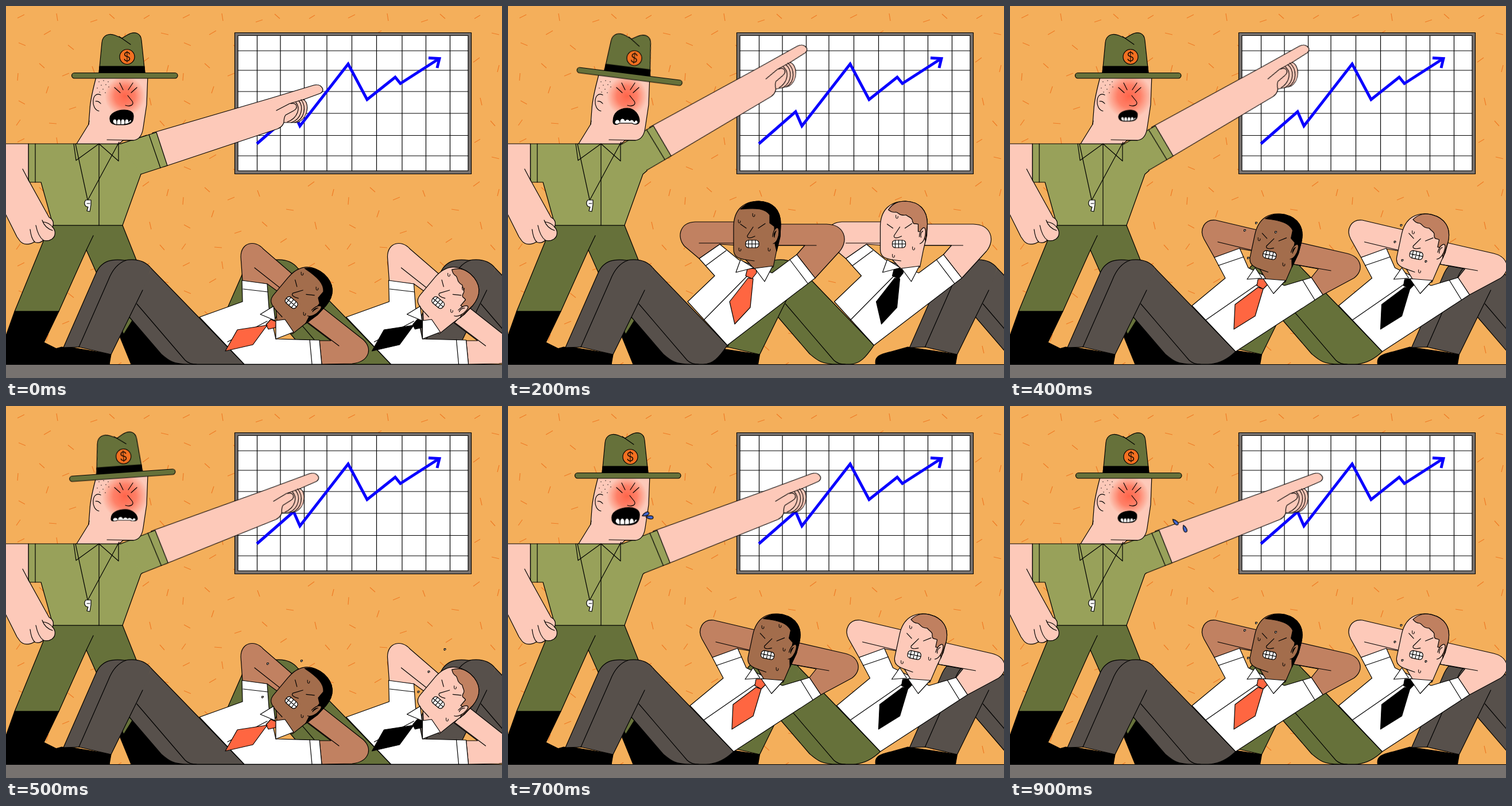
Recreate the animation shown at these times as an HTML page without scripts. Size 864 px wide and 648 px high, loop 1000 ms.

```html
<!DOCTYPE html>
<html lang="en">
<head>
<meta charset="utf-8">
<title>Sales drill</title>
<style>
html, body { margin: 0; width: 100%; height: 100%; overflow: hidden; background: #f4af5b; }
svg { display: block; width: 100vw; height: 100vh; }
.ink, .ink path, .ink circle, .ink rect { stroke: #000; stroke-width: 1.2; stroke-linejoin: round; stroke-linecap: round; }
.line { fill: none; }
.white { fill: #fff; }
.skin { fill: #fdc9b9; }
.shirt { fill: #98a15a; }
.olive { fill: #66713a; }
.grey { fill: #77726f; }
.arm { fill: var(--skin); }
.face { fill: var(--face); }
.pants { fill: var(--pants); }
.tie { fill: var(--tie); }
.hair-a { display: var(--a, none); }
.hair-b { display: var(--b, none); fill: #c08060; }
.man-a { --skin: #c18161; --face: #a36d4c; --pants: #57504b; --tie: #ff6641; --a: inline; }
.man-b { --skin: #fdc9b9; --face: #fdc9b9; --pants: #66713a; --tie: #000; --b: inline; }
.man-c { --pants: #57504b; }
.ink .drops, .ink .beads, .ink .stubble { fill: none; stroke: none; }
.drops { marker: url(#drop); }
.beads { marker: url(#bead); }
.stubble { marker: url(#dot); }

.low, .mid, .up, .low1, .low2, .mid1, .mid2, .up1, .up2, .reach, .hat, .open, .frown, .blush, .spit1, .spit2 { animation: 1s step-end infinite; }
.low { animation-name: low; }
.mid { animation-name: mid; }
.up { animation-name: up; }
.low1 { animation-name: low1; }
.low2 { animation-name: low2; }
.mid1 { animation-name: mid1; }
.mid2 { animation-name: mid2; }
.up1 { animation-name: up1; }
.up2 { animation-name: up2; }
.reach { animation-name: reach; transform-origin: 205px 255px; }
.hat { animation-name: hat; transform-origin: 206.5px 121px; }
.open { animation-name: open; }
.frown { animation-name: frown; }
.blush { animation-name: blush; transform-origin: 207px 157px; }
.spit1 { animation-name: spit1; }
.spit2 { animation-name: spit2; }

@keyframes low { 0%, 50% { visibility: visible } 10%, 70% { visibility: hidden } }
@keyframes mid { 0%, 20%, 50%, 80% { visibility: hidden } 10%, 40%, 70%, 90% { visibility: visible } }
@keyframes up { 0%, 40%, 90% { visibility: hidden } 20%, 80% { visibility: visible } }
@keyframes low1 { 0%, 60% { visibility: visible } 10%, 70% { visibility: hidden } }
@keyframes low2 { 0%, 60% { visibility: hidden } 50% { visibility: visible } }
@keyframes mid1 { 0%, 20%, 80% { visibility: hidden } 10%, 70% { visibility: visible } }
@keyframes mid2 { 0%, 50% { visibility: hidden } 40%, 90% { visibility: visible } }
@keyframes up1 { 0%, 30%, 90% { visibility: hidden } 20%, 80% { visibility: visible } }
@keyframes up2 { 0%, 40% { visibility: hidden } 30% { visibility: visible } }
@keyframes reach {
  0%, 60% { transform: none }
  10%, 50%, 70%, 90% { transform: rotate(-3.5deg) }
  20%, 80% { transform: rotate(-12.3deg) }
}
@keyframes hat {
  0%, 10%, 90% { transform: none }
  20% { transform: translate(5px, 1.5px) rotate(7.2deg) }
  30% { transform: translate(2px, 1px) rotate(3deg) }
  40% { transform: translate(-1px, 0) }
  50% { transform: translate(-4px, -.5px) rotate(-4deg) }
  60% { transform: translate(-1px, 0) rotate(-1.5deg) }
  70% { transform: translate(2px, 0) }
  80% { transform: translate(1px, 0) }
}
@keyframes open {
  0% { transform: translate(202px, 194px) }
  10% { transform: translate(205px, 192px) scale(1.14) }
  20%, 30%, 50%, 80% { transform: scale(0) }
  40% { transform: translate(206px, 191px) scale(.8, .75) }
  60% { transform: translate(204px, 192px) scale(1.05, .95) }
  70% { transform: translate(205.5px, 192px) scale(1.17) }
  90% { transform: translate(205px, 193px) scale(.8, .78) }
}
@keyframes frown {
  0%, 40%, 60%, 90% { transform: scale(0) }
  20%, 80% { transform: translate(206px, 193px) }
  30% { transform: translate(206px, 192px) scale(.9, .85) }
  50% { transform: translate(206px, 191px) scale(1, .72) }
}
@keyframes blush { 0%, 60% { transform: none } 30% { transform: scale(1.14) } }
@keyframes spit1 {
  0% { transform: scale(0) }
  70% { transform: translate(241px, 188px) rotate(-25deg) }
  80% { transform: translate(268px, 186px) rotate(10deg) }
  90% { transform: translate(289px, 203px) rotate(45deg) }
}
@keyframes spit2 {
  0% { transform: scale(0) }
  70% { transform: translate(248px, 194px) rotate(5deg) }
  80% { transform: translate(280px, 198px) rotate(35deg) }
  90% { transform: translate(305px, 215px) rotate(68deg) }
}
</style>
</head>
<body>
<svg viewBox="0 0 864 648">
<defs>
  <pattern id="flecks" width="288" height="216" patternUnits="userSpaceOnUse">
    <path fill="none" stroke="#ee7a24" stroke-width="1.2" d="M20 21l12-6M88 13l2 13M147 28l12-4M180 14l9 8M240 22l10-6M22 64l12 5M66 50l12-7M108 68l10 8M270 47l13 3M205 60l3-12M20 130l1-13M58 100l9 8M98 122l12-5M150 105l4 11M238 98l11-8M280 115l3-12M22 165l11 6M70 152l4-12M110 180l12-4M158 160l9 8M200 138l13 2M250 160l3 13M18 208l7-10M75 204l13 1M190 196l11-7M268 200l8 9"/>
  </pattern>
  <radialGradient id="rage">
    <stop offset="0" stop-color="#ff5a3e" stop-opacity=".9"/><stop offset=".5" stop-color="#ff6145" stop-opacity=".7"/><stop offset="1" stop-color="#ff6a4a" stop-opacity="0"/>
  </radialGradient>
  <marker id="drop" markerUnits="userSpaceOnUse" markerWidth="10" markerHeight="10" viewBox="-5 -5 10 10"><path fill="none" stroke="#000" d="M-1.8-3V1a1.8 2 0 0 0 3.6 0v-2"/></marker>
  <marker id="bead" markerUnits="userSpaceOnUse" markerWidth="10" markerHeight="10" viewBox="-5 -5 10 10"><path fill="#a39a94" stroke="#000" d="M-1.5-1.5h3v2l-1 1h-2z"/></marker>
  <marker id="dot" markerUnits="userSpaceOnUse" markerWidth="4" markerHeight="4" viewBox="-2 -2 4 4"><circle r=".7"/></marker>

  <g id="shin">
    <path d="M41 624C38 607 55 606 72 601L97 594 183 607 180 624Z"/>
    <path class="pants" d="M238 495L183 607 127 594 100 595 157 465C168 440 190 441 207 443 225 440 242 443 253 457"/>
    <path class="line" d="M127 594L178 478C186 457 197 447 209 443"/>
  </g>
  <path id="crease" class="line" d="M228 519L312 617Q319 624 332 624"/>

  <g id="head">
    <path class="face" d="M-41-15C-41-45-24-60 3-60 27-59 41-45 41-20L40 0 34 25 28 55-5 58-20 42C-34 40-41 36-41 24Z"/>
    <path class="hair-a" d="M-29-46C-20-56-10-60 3-60 27-59 41-45 41-20L40 2 34 27 31 14 30-16 22-22 22-36C14-47 0-49-29-46Z"/>
    <path class="hair-b" d="M-27-45C-18-58-8-60 3-60 27-59 41-45 41-20L38 10 33-7H25V-20C20-22 17-18 15-25 15-32 8-32 4-36-8-34-8-40-14-41-20-40-23-42-27-45Z"/>
    <path class="face" d="M27 2C28-13 38-20 38-7 38 3 34 12 28 14M33-8Q28-4 30 3"/>
    <path class="line" d="M-29-20L-19-13M14-21L2-13M-7-15L-17 0C-18 6-10 4-4 1M-20 42L-5 44"/>
    <rect class="white" x="-20" y="8" width="23" height="13" rx="5"/>
    <path class="line" d="M-15 8v13M-9 8v13M-3 8v13M-20 14.5H3"/>
  </g>

  <g id="low">
    <path class="pants" d="M253 457L415 624H318C290 624 283 617 270 606L215 542"/>
    <use href="#crease"/>
    <path class="arm" d="M412 479L409 437C409 411 434 407 448 423L500 468 480 502 455 484Z"/>
    <path class="line" d="M433 456L476 490"/>
    <path class="arm" d="M525 552L551 525 622 581C640 597 632 620 603 623L550 624 546 583H566Z"/>
    <path class="line" d="M527 552L580 592"/>
    <path class="white" d="M411 478L455 484 458 525 470 580 546 582 550 624H415L337 542 412 515Z"/>
    <path class="line" d="M413 493L456 498M529 581L533 624M386 585L455 549"/>
    <path class="tie" d="M382 601L403 564 455 556 430 590ZM453 555L461 546 471 550 470 560 457 563Z"/>
    <use href="#head" transform="translate(513 511) rotate(40)"/>
    <path class="white" d="M443 537L466 523 469 548ZM470 548V580L501 568 486 546Z"/>
  </g>
  <g id="mid">
    <path class="pants" d="M253 457L393 602C375 619 360 624 345 624H318C290 624 283 617 270 606L215 542"/>
    <use href="#crease"/>
    <path class="arm" d="M430 390L358 373C339 371 329 389 338 406L356 438 401 423 424 427Z"/>
    <path class="line" d="M362 411L424 426"/>
    <path class="arm" d="M500 411L587 431C612 437 618 460 599 474L545 503 525 473 537 458 494 450Z"/>
    <path class="line" d="M495 450L559 461"/>
    <path class="white" d="M356 438L400 422 415 456 478 487 525 473 545 503 393 602 317 522 375 474Z"/>
    <path class="line" d="M363 452L407 437M510 478L531 512M432 484L341 547"/>
    <path class="tie" d="M432 490L441 493 427 540 390 563 392 520ZM432 476L446 475 449 485 441 493 430 487Z"/>
    <use href="#head" transform="translate(463.5 421.5) rotate(12)"/>
    <path class="white" d="M413 476L427 456 439 474ZM441 475L459 501 480 478Z"/>
  </g>
  <g id="up">
    <path class="pants" d="M253 457L382 591C368 612 357 624 340 624H318C290 624 283 617 270 606L215 542"/>
    <use href="#crease"/>
    <path class="arm" d="M398 376H326C300 377 293 401 307 418L333 440 369 415 400 417Z"/>
    <path class="line" d="M333 413H400"/>
    <path class="arm" d="M470 380H555C586 381 594 407 578 427L535 474 503 433 517 417H468Z"/>
    <path class="line" d="M470 417H537"/>
    <path class="white" d="M333 440L369 415 402 442 460 465 503 433 535 474 382 591 313 515 360 470Z"/>
    <path class="line" d="M345 452L380 426M491 442L522 483M416 471L341 547"/>
    <path class="tie" d="M418 474L427 475 422 525 395 554 386 515ZM417 458L432 457 433 465 425 475 414 470Z"/>
    <use href="#head" transform="translate(434 400)"/>
    <path class="white" d="M397 464L405 442 428 456ZM430 457L447 480 461 453Z"/>
  </g>
  <path id="drip" d="M-8 0C-3-3.5 5-4 5 0S-3 3.5-8 0Z"/>
</defs>

<rect width="864" height="648" fill="#f4af5b"/>
<rect width="864" height="648" fill="url(#flecks)"/>

<g class="ink">
  <rect class="grey" x="398.5" y="46.5" width="412" height="246"/>
  <rect class="white" x="404" y="51.5" width="401" height="235.5"/>
  <path class="line" d="M437.5 52V287M478 52V287M519.5 52V287M559 52V287M602.5 52V287M645.5 52V287M690 52V287M731.5 52V287M773.5 52V287M404 78H805M404 112H805M404 149H805M404 187H805M404 225.5H805M404 261H805"/>
</g>
<path fill="none" stroke="#0a00ff" stroke-width="5" d="M437 240L501 184 512 209 596 101 629 163 678 124 687 135 754 92M736 90.5L755 91.5 751 108"/>

<!-- sergeant -->
<g class="ink">
  <path d="M195 540L240 530 322 624H218L198 575Z"/>
  <path class="olive" d="M82 382H203L250 500 205 572 140 425 92 532H15L67 405Z"/>
  <path class="line" d="M152 400L140 425"/>
  <path d="M15 532H92L66 586 88 597 110 594 180 606V624H0V574Z"/>
  <path class="shirt" d="M39 240H200L245 225 242 287 235 293 203 382H82L61 307H39Z"/>
  <path class="line" d="M51 240V307M162 240V382"/>
  <path class="skin" d="M-5 240H39V303L75 368C82 372 84 378 81 385 87 391 87 401 80 406 74 410 68 409 65 408 60 413 54 413 49 411 42 416 30 417 24 409L19 402-5 354Z"/>
  <path class="line" d="M29 284L40 305M42 389C43 398 45 406 50 411M52 382C54 392 57 402 65 408M63 373C66 382 72 388 81 391M64 376Q75 377 81 385"/>

  <g class="reach">
    <path class="skin" d="M255 221L460 161 536 138C549 134 557 147 548 152L518 163C529 168 527 196 507 203L484 203C482 209 478 212 473 214L275 280Z"/>
    <path class="line" d="M518 163L494 170 471 182M496 170C507 168 510 178 500 183L487 190C484 194 484 199 484 203M505 168C513 177 509 195 490 202M510 165C519 176 515 197 497 203M514 163C524 176 520 197 503 203"/>
    <path class="shirt" d="M200 240L262 220 281 278 235 293"/>
    <path class="line" d="M249 224L269 282"/>
  </g>

  <path class="skin" d="M123 240L144 206 146 180C147 160 153 140 158 120H247L245 172 239 212C237 227 231 233 222 234H204L197 240Z"/>
  <circle class="blush" cx="207" cy="157" r="35" fill="url(#rage)" style="stroke:none"/>
  <path class="line" d="M176 233L222 234M145 200L144 206M165 155C149 147 147 180 162 183M156 166Q161 165 165 170"/>
  <path class="line" d="M189 142L199 151M198 134L204 146M221 134L213 146M228 142L218 151M212 156L220 166C224 172 216 176 208 173"/>
  <path class="stubble" d="M162 132L170 130 178 132 166 138 174 137 159 143 169 145 179 141 163 150 173 151"/>
  <path class="line" d="M118 240L122 269 162 240 196 270V240M121 240L142 337M197 237L143 337"/>
  <path class="white" d="M139 338C135 343 137 350 143 350L141 357 146 358 148 346V338Z"/>
  <path class="line" d="M141 344h5"/>

  <g class="open">
    <path d="M-21 3C-23-14 21-20 20-2 20 10 14 13 0 13H-10C-18 12-21 9-21 3Z"/>
    <path class="white" d="M-16 8a3.5 5 0 0 1 7 0a3.5 5 0 0 1 7 0a3.5 5 0 0 1 7 0a3.5 5 0 0 1 7 0a3 5 0 0 1 5-2Q13 12 0 12.500H-10Q-14 12-16 8ZM-9 8v4M-2 8v4M5 8v4"/>
  </g>
  <g class="frown">
    <path d="M-23 8C-23-8-11-15 2-15S23-2 23 8C22 14 15 14 10 11H-12C-18 15-23 14-23 8Z"/>
    <path class="white" d="M-20 11a4.5 5 0 0 1 9-2a4.5 5 0 0 1 9-2a4.5 5 0 0 1 8 0a4.5 5 0 0 1 8 2a3 4 0 0 1 6 2Q15 15 10 11H-12Q-17 15-20 11Z"/>
  </g>

  <g class="hat">
    <path class="olive" d="M162 117L167 64C168 50 180 47 190 51L202 56 212 50C224 43 235 47 236 60L242 117Z"/>
    <path d="M163 105H241L242 117H162Z"/>
    <path class="line" d="M197 53L217 67"/>
    <rect class="olive" x="114.5" y="116.5" width="184.500" height="9.500" rx="4.700"/>
    <circle cx="211" cy="88.500" r="13" fill="#f37021"/>
    <text x="211" y="96" text-anchor="middle" font-family="Inter, Lato, sans-serif" font-size="21" font-weight="300" stroke="none">$</text>
  </g>
  <g fill="#4268d0">
    <use class="spit1" href="#drip"/>
    <use class="spit2" href="#drip"/>
  </g>
</g>

<!-- trainees, far to near -->
<g class="ink">
  <g class="man-c" transform="translate(599.5)">
    <path class="pants" d="M253 457L393 602V624H318C290 624 283 617 270 606L215 542"/>
    <use href="#crease"/>
    <use href="#shin"/>
  </g>
  <g class="man-b" transform="translate(255.5)">
    <use class="low" href="#low"/>
    <use class="mid" href="#mid"/>
    <use class="up" href="#up"/>
    <use href="#shin"/>
    <path class="drops low1" d="M516 468L541 492 521 531"/>
    <path class="drops mid1" d="M446 385L479 440 431 446"/>
    <path class="drops up1" d="M422 367L416 435 451 422"/>
    <g class="low2"><path class="drops" d="M527 490L513 546"/><path class="beads" d="M509 424L481 463 463 498"/></g>
    <g class="mid2"><path class="drops" d="M447 394L458 462"/><path class="beads" d="M426 382L415 411 428 443 469 445"/></g>
    <g class="up2"><path class="drops" d="M407 386L444 432"/><path class="beads" d="M398 358L390 390 404 424 455 420"/></g>
  </g>
  <g class="man-a">
    <use class="low" href="#low"/>
    <use class="mid" href="#mid"/>
    <use class="up" href="#up"/>
    <use href="#shin"/>
    <path class="drops low1" d="M516 466L542 492 520 536"/>
    <path class="drops mid1" d="M444 385L474 383 481 424 469 458"/>
    <path class="drops up1" d="M403 375L428 364 404 424 455 424"/>
    <g class="low2"><path class="drops" d="M527 480L516 540"/><path class="beads" d="M456 449L515 444 447 507"/></g>
    <g class="mid2"><path class="drops" d="M434 406L477 450"/><path class="beads" d="M429 378L409 391 463 394 415 439"/></g>
    <g class="up2"><path class="drops" d="M406 384L452 434"/><path class="beads" d="M398 356L386 370 430 366 397 424"/></g>
  </g>
  <rect class="grey" x="-2" y="624.5" width="868" height="30"/>
</g>
</svg>
</body>
</html>
```
